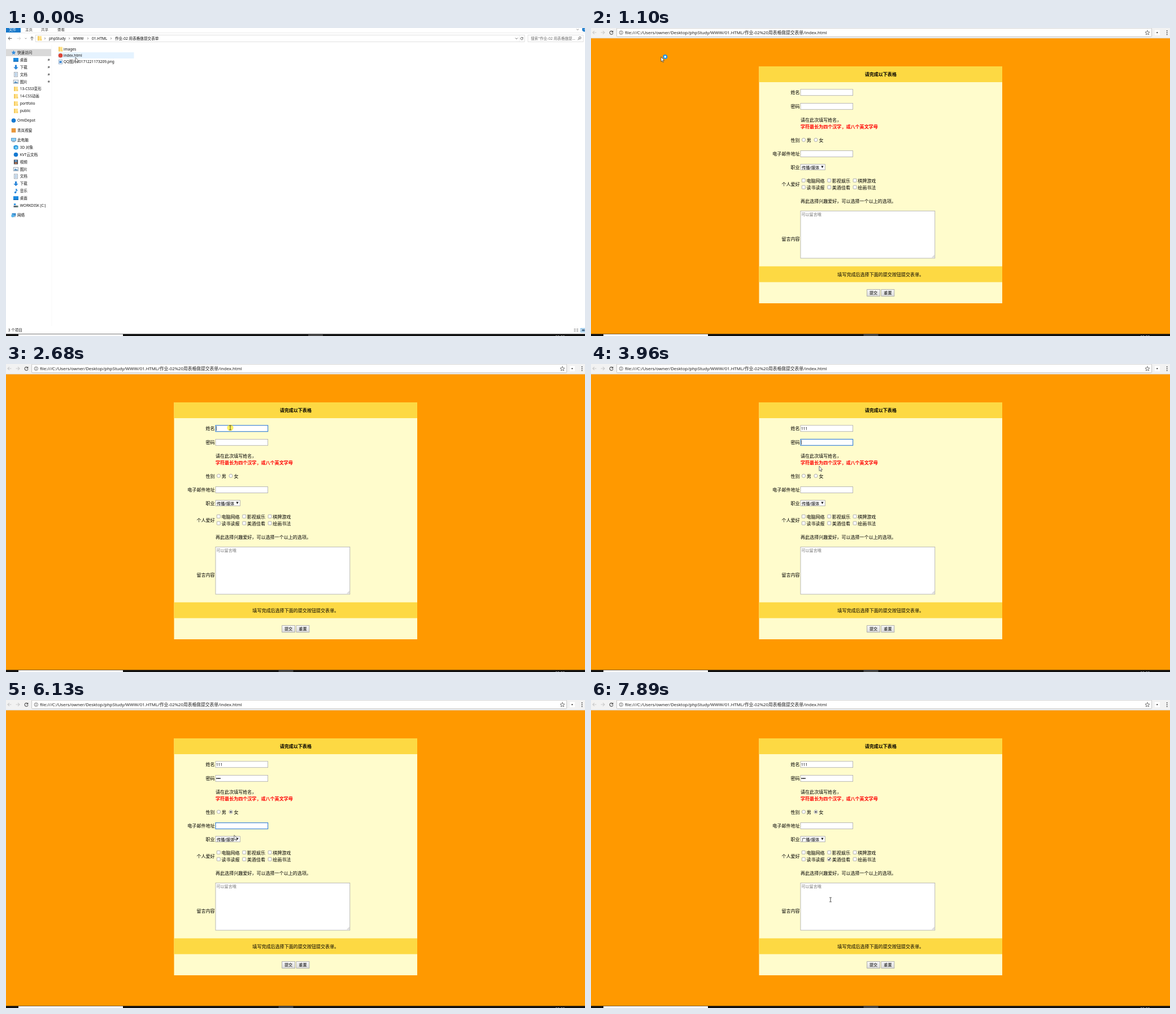
An HTML page that plays this animation: 1025 by 546 pixels, repeating every 8000 ms.

```html
<!DOCTYPE html>
<html>
<head>
<meta charset="utf-8">
<title>Form demo</title>
<style>
html, body { margin: 0; width: 100%; height: 100%; overflow: hidden; background: #fff; }
svg { display: block; width: 100%; height: 100%; }
text { font-family: "Noto Sans", "Noto Sans CJK SC", "Noto Sans CJK", sans-serif; white-space: pre; }
</style>
</head>
<body>
<svg id="stage" viewBox="0 0 1025 546" xmlns="http://www.w3.org/2000/svg"></svg>
<script>
const LOOP = 8000;
const SMALL = 6.6, BODY = 8.06, FIELD = 7.1;

// ---------- drawing helpers ----------
const rect = (x, y, w, h, fill, extra = '') =>
  `<rect x="${x}" y="${y}" width="${w}" height="${h}" fill="${fill}" ${extra}/>`;
const box = (x, y, w, h, fill, line, extra = '') =>
  rect(x, y, w, h, fill, `stroke="${line}" stroke-width=".8" ${extra}`);
const circle = (x, y, r, fill, extra = '') =>
  `<circle cx="${x}" cy="${y}" r="${r}" fill="${fill}" ${extra}/>`;
const line = (d, color, width = 1, extra = '') =>
  `<path d="${d}" fill="none" stroke="${color}" stroke-width="${width}" ${extra}/>`;
const shape = (d, fill, extra = '') => `<path d="${d}" fill="${fill}" ${extra}/>`;
const text = (x, cy, s, size = BODY, fill = '#000', extra = '') =>
  `<text x="${x}" y="${(cy + size * .37).toFixed(2)}" font-size="${size}" fill="${fill}" ${extra}>${s}</text>`;
const group = (id, body, extra = '') => `<g id="${id}" ${extra}>${body}</g>`;
const place = (x, y, body) => `<g transform="translate(${x} ${y})">${body}</g>`;

// ---------- file manager ----------
const icons = {
  folder: rect(-3.5, -4, 7, 8, '#ffe08a') + rect(-3.5, -4, 2, 8, '#f3c95c') + rect(1.8, 1, 2, 3, '#f5d06c'),
  desk: rect(-4.5, -3.5, 9, 6.5, '#1c8ae0') + rect(-4.5, 2, 9, 1.2, '#0b5fa8'),
  down: shape('M-1.6 -4H1.6V0H4.2L0 4.3-4.2 0H-1.6Z', '#2b86d9'),
  doc: box(-3, -4, 6, 8, '#fff', '#8a97a5') + line('M-1.7 -2H1.7M-1.7 0H1.7M-1.7 2H1.7', '#4f8fcb', .8),
  pic: box(-4.3, -3, 8.6, 6, '#eef5fb', '#8a97a5') + shape('M-3.5 2.3L-1 -1 1 1 2.2 0 3.5 2.3Z', '#3f7fb5'),
  file: box(-3, -3.8, 6, 7.6, '#fff', '#7d9cc0') + rect(-1.9, -1.6, 3.8, 3.6, '#2d7fd0'),
  star: shape('M0 -4L1.2 -1.3 4 -1 1.8 .9 2.5 3.8 0 2.2-2.5 3.8-1.8 .9-4 -1-1.2 -1.3Z', '#2f8be0'),
  pc: rect(-4.3, -3.6, 8.6, 5.6, '#3c7fb8') + rect(-3.5, -2.9, 7, 4.2, '#8fd0f5') + rect(-2.5, 2.7, 5, 1, '#7b8a98'),
  cube: shape('M-4 -2.6L0 -4 4 -2.6V2.8L0 4.2-4 2.8Z', '#2496dd') + rect(-1.6, -1.4, 4, 4, '#7cd0f4'),
  film: rect(-3.6, -4, 7.2, 8, '#3d4656') + rect(-2, -3.2, 4, 3, '#6ea7d8') + rect(-2, .4, 4, 3, '#b4734f'),
  note: circle(-1, 2.5, 1.7, '#2688dd') + line('M.4 2.5V-4Q1 -1.6 3 -.6', '#2688dd', 1.2),
  disk: rect(-4, .2, 8, 3, '#5c6670') + rect(-3.6, -3.4, 3.4, 2.6, '#1c8ae0') + rect(1.4, 1.2, 1.6, .9, '#6fe08a'),
  net: rect(-3, -3.4, 7, 4.8, '#3c8fd0') + circle(-1.6, 1.2, 2.6, '#58b4ea') + rect(.5, 2.2, 3, 1, '#7b8a98'),
  round: circle(0, 0, 3.8, '#1479d2'),
  square: rect(-3.8, -3.8, 7.6, 7.6, '#e8963a'),
  dot: circle(0, 0, 3.8, '#db4437')
};
const sideRows = [
  ['star', '快速访问', 43.5, 1], ['desk', '桌面', 56.5], ['down', '下载', 69.5], ['doc', '文档', 82.5],
  ['pic', '图片', 95.2], ['folder', '13-CSS3变形', 108], ['folder', '14-CSS动画', 121],
  ['folder', 'portfolio', 134], ['folder', 'public', 147], ['round', 'OmiDepot', 164, 1],
  ['square', '青岚视窗', 181.5, 1], ['pc', '此电脑', 198.5, 1], ['cube', '3D 对象', 211.5],
  ['round', 'KVT云文档', 224.5], ['film', '视频', 237.5], ['pic', '图片', 250.2], ['doc', '文档', 263],
  ['down', '下载', 276], ['note', '音乐', 289], ['desk', '桌面', 301.7],
  ['disk', 'WORKDISK (C:)', 314.7], ['net', '网络', 331.7, 1]
];
const back = 'M3.4 0H-3M0 -2.8L-3 0 0 2.8', fwd = 'M-3.4 0H3M0 -2.8L3 0 0 2.8';
const chevron = (x, y) => place(x, y, line('M-.8 -1.5L.8 0-.8 1.5', '#555', .8));
const reload = (x, y, r, color) => place(x, y,
  line(`M${r * .8} ${-r * .6}A${r} ${r} 0 1 0 ${r} ${r * .3}`, color, r * .38) +
  shape(`M${r * 1.1} ${-r * 1.2}V${-r * .1}H0Z`, color));

function explorer() {
  let s = rect(0, 0, 1025, 546, '#fff') + rect(0, 0, 26, 8, '#1979ca') + text(5, 2.5, '文件', SMALL, '#fff');
  [[34, '主页'], [62, '共享'], [91, '查看']].forEach(([x, w]) => s += text(x, 2.5, w, SMALL, '#333'));
  s += line('M26 8.7H1025', '#e3e3e3', .8) + line('M1010 1.8L1012 3.6 1014 1.8', '#777', .8) +
    circle(1024, 2.5, 4, '#1979ca') + text(1022.5, 2.5, '?', 5.5, '#fff');
  s += place(7, 18.5, line(back, '#444', .9)) + place(23, 18.5, line(fwd, '#d0d0d0', .9)) +
    line('M33.5 17.7L35 19.2 36.5 17.7', '#777', .8) +
    line('M46 22V15.5M43.2 18.3L46 15.5 48.8 18.3', '#444', .9);
  s += box(52.5, 12.4, 865.5, 12.2, '#fff', '#d9d9d9') + box(924, 12.4, 98, 12.2, '#fff', '#d9d9d9') +
    line('M908.5 12.4V24.6', '#e4e4e4', .6) + place(59.5, 18.3, icons.folder);
  [69, 112, 145, 186].forEach(x => s += chevron(x, 18.5));
  [[76, 'phpStudy'], [119, 'WWW'], [152, '01.HTML'], [193, '作业-02 用表格做提交表单']]
    .forEach(([x, w]) => s += text(x, 18.3, w, SMALL, '#111'));
  s += line('M901.8 17.6L903.8 19.6 905.8 17.6', '#555', .9) + reload(913, 18.6, 2.2, '#555') +
    text(929, 18.3, '搜索"作业-02 用表格做提...', SMALL, '#6d6d6d') +
    circle(1016, 17.5, 1.9, 'none', 'stroke="#444" stroke-width=".8"') + line('M1014.7 18.9L1012.3 21.2', '#444', 1);
  s += rect(0, 37.3, 80, 12.6, '#d9d9d9') + line('M81 30V528', '#f8f8f8', .8);
  sideRows.forEach(([icon, label, y, top], i) => {
    s += place(top ? 13.5 : 17.5, y, icons[icon]) + text(top ? 20 : 24.7, y, label, SMALL, '#111');
    if (i > 0 && i < 5)
      s += place(75.5, y, shape('M.2 -2.5L2.5 -.2 1.6 .2 .6 2-.6 .9-2.6 2.6-.9 .6-2 -.6-.2 -1.6Z', '#777'));
  });
  s += rect(92, 43.1, 134.5, 10.9, '#e5f3ff', 'id="row"');
  [['folder', 'images', 37.5], ['dot', 'index.html', 48.7], ['file', 'QQ图片20171221173209.png', 60]]
    .forEach(([icon, label, y]) => s += place(96.5, y, icons[icon]) + text(101.7, y, label, SMALL, '#111'));
  s += text(3.7, 536, '3 个项目', SMALL, '#222');
  for (let y = 533.5; y < 539; y += 2.2) s += line(`M1005.5 ${y}H1008.5M1010 ${y}H1013`, '#777', .8);
  return s + box(1017.5, 532.4, 9, 6.8, '#cfe8fb', '#6aaee0') + rect(1019.5, 534.2, 5, 3.2, '#4a6f8f');
}

// ---------- browser ----------
const field = (id, y) => box(371, y, 92.6, 10.9, '#fff', '#a9a9a9', `id="${id}"`);
const label = (y, s) => text(369.6, y, s, BODY, '#000', 'text-anchor="end"');
const radio = (id, x) => circle(x, 198.3, 3.1, '#fbfbfb', `id="${id}" stroke="#999" stroke-width=".8"`);
const check = (x, y) => box(x - 3, y - 3, 6, 6, '#fbfbfb', '#a0a0a0', 'rx=".7"');
const mid = 'text-anchor="middle"';
const jobs = ['传播/媒体', '社会/媒体', '广播/媒体', '电视/媒体'];
const ITEM = 9.7;

function form() {
  let s = rect(0, 18, 1025, 525, '#ff9900') + rect(297.5, 68, 430.5, 420, '#fffccc') +
    rect(297.5, 68, 430.5, 28, '#fdd943') + rect(297.5, 422.5, 430.5, 28, '#fdd943');
  s += text(512.8, 82, '请完成以下表格', BODY, '#000', mid + ' font-weight="700"') +
    text(512.8, 437, '填写完成后选择下面的提交按钮提交表单。', BODY, '#000', mid);
  [[114.3, '姓名'], [139, '密码'], [198.6, '性别'], [223, '电子邮件地址'],
   [247, '职业'], [277, '个人爱好'], [373.7, '留言内容']].forEach(([y, w]) => s += label(y, w));
  s += field('name', 108.8) + field('pass', 133.4) + field('mail', 217.6);
  s += text(371, 163, '请在此次填写姓名，') +
    text(371, 175, '字符最长为四个汉字，或八个英文字母', BODY, '#f00', 'font-weight="700"') +
    text(371, 306.7, '再此选择兴趣爱好，可以选择一个以上的选项。');
  s += radio('male', 376.5) + text(381.8, 198.6, '男') + radio('female', 398) + text(403.6, 198.6, '女') +
    circle(398, 198.3, 1.6, '#4a4a4a', 'id="picked"');
  [['电脑网络', '影视娱乐', '棋牌游戏'], ['读书读报', '美酒佳肴', '绘画书法']].forEach((row, j) =>
    row.forEach((w, i) => s += check(376.3 + i * 45.4, 270.2 + j * 12) + text(381.4 + i * 45.4, 271 + j * 12, w)));
  s += line('M419.9 282.2L421.3 283.9 423.7 280.1', '#333', 1.2, 'id="tick"');
  s += box(371, 241.6, 43.4, 10, '#f8f8f8', '#a9a9a9', 'id="select"') +
    text(373.3, 247.2, jobs[0], 7, '#000', 'id="job"') + shape('M407.4 244.6H411.6L409.5 248.2Z', '#111');
  s += box(371, 324.3, 237.8, 83.8, '#fff', '#a9a9a9') + text(372.4, 330, '可以留言哦', FIELD, '#757575') +
    line('M603.8 407L608 402.8M606 407L608 405', '#888', .6);
  [[488.6, '提交'], [513.9, '重置']].forEach(([x, w]) =>
    s += box(x, 463.6, 23, 11.8, 'url(#btn)', '#a0a0a0') + text(x + 11.5, 469.6, w, FIELD, '#000', mid));
  s += text(372, 114.3, '', 6.5, '#000', 'id="typed"') + group('dots', [0, 1, 2].map(i =>
    circle(373.4 + i * 2.6, 139, 1.1, '#000')).join('')) + rect(0, 0, .7, 8, '#222', 'id="caret"');
  let list = box(371, 251.8, 43.4, 40, '#fff', '#8f8f8f') + rect(371.4, 0, 42.6, ITEM, '#1e90ff', 'id="hover"');
  jobs.forEach((w, i) => list += text(373.3, 257.2 + i * ITEM, w, 7, '#000', 'class="item"'));
  return s + group('menu', list);
}

function browser() {
  return rect(0, 0, 1025, 543, '#fff') + group('form', form()) + rect(0, 0, 1025, 18, '#f2f2f2') +
    line('M0 18H1025', '#d0d0d0', .7) + box(45.6, .2, 947, 15.2, '#fff', '#b8b8b8', 'rx="1"') +
    place(6, 8, line(back, '#c9c9c9', 1.1)) + place(21, 8, line(fwd, '#c9c9c9', 1.1)) + reload(36, 8.2, 3, '#555') +
    circle(53.3, 8.2, 3.2, 'none', 'stroke="#555" stroke-width=".8"') + line('M53.3 7.6V10M53.3 6.1V6.9', '#555', .9) +
    text(60, 8, 'file:///C:/Users/owner/Desktop/phpStudy/WWW/01.HTML/作业-02%20用表格做提交表单/index.html', 7.77, '#222') +
    place(985, 8.2, shape(icons.star.match(/d="([^"]+)"/)[1], 'none', 'stroke="#555" stroke-width=".8"')) +
    rect(998, 3.5, 9, 9.5, '#fff') + circle(1002.3, 8.2, 1.1, '#333') +
    [5, 8.2, 11.4].map(y => circle(1019.7, y, 1, '#555')).join('');
}

const taskbar = rect(0, 542.3, 1025, 4, '#101010') + rect(22, 542.8, 185, 4, '#fff') +
  rect(535, 542.3, 26, 4, '#464646', 'id="task"') + text(972.5, 547.2, '20:22', SMALL, '#ddd');

const pointer = circle(0, 0, 5.6, '#ffe600', 'id="halo" opacity=".62"') +
  group('arrow', shape('M0 0V8.6L1.9 6.9 3.2 9.9 4.5 9.3 3.2 6.4H5.7Z', '#fff', 'stroke="#111" stroke-width=".6"') +
    circle(7.3, 0, 3, '#e8f6ff', 'id="ring" stroke="#1d93e8" stroke-width="2.2"')) +
  line('M-1.9 -3.8H-.5L0 -3.4 .5 -3.8H1.9M0 -3.4V3.4M-1.9 3.8H-.5L0 3.4 .5 3.8H1.9', '#333', .9, 'id="beam"');

const $ = id => document.getElementById(id);
$('stage').innerHTML = '<defs><linearGradient id="btn" x2="0" y2="1"><stop stop-color="#f7f7f7"/>' +
  '<stop offset="1" stop-color="#dcdcdc"/></linearGradient></defs>' +
  group('files', explorer()) + group('web', browser()) + taskbar + group('pointer', pointer);

// ---------- timeline ----------
// Pointer bursts: start, end, number of steps, goal x, goal y
const moves = [
  [100, 100, 1, 124, 51], [1440, 1873, 5, 404, 187], [1982, 2090, 2, 402, 122], [2310, 2540, 3, 397, 113],
  [2970, 3310, 4, 406, 167], [3450, 3873, 5, 404, 181], [3979, 4190, 3, 395, 161], [4300, 4300, 1, 398, 142],
  [4440, 4630, 3, 402, 203], [4840, 4940, 2, 404, 202], [5080, 5280, 3, 399, 198], [5490, 5600, 2, 403, 221],
  [5810, 5910, 2, 404, 233], [6060, 6165, 2, 404, 246], [6270, 6690, 5, 395, 276], [6910, 7140, 3, 421, 282],
  [7573, 7670, 2, 425, 327], [7820, 7890, 2, 424, 354]
];
const presses = [[580, 790], [2680, 2770], [5280, 5380], [5600, 5810], [6165, 6270], [6830, 6910], [7380, 7477]];
const focusLog = [[0, ''], [2680, 'name'], [3767, 'pass'], [5280, ''], [5600, 'mail'], [6165, 'select'], [7380, '']];
const nameKeys = [3450, 3556, 3661], passKeys = [4190, 4440, 4535];
const wakes = [2680, ...nameKeys, 3767, ...passKeys, 5600];
const caretY = { name: 110.2, pass: 134.8, mail: 219 };

const count = (times, t) => times.filter(k => t >= k).length;
const within = (t, [a, b]) => t >= a && t < b;
const show = (id, on) => $(id).setAttribute('display', on ? 'inline' : 'none');
const set = (id, key, value) => $(id).setAttribute(key, value);

function pointerAt(t) {
  let x = 123, y = 52;
  for (const [t0, t1, n, gx, gy] of moves) {
    if (t < t0) break;
    const step = n < 2 ? 1 : Math.min(n, Math.floor((t - t0) * (n - 1) / (t1 - t0) + .01) + 1);
    x += (gx - x) * step / n;
    y += (gy - y) * step / n;
  }
  return [x, y];
}

function render(t) {
  const [x, y] = pointerAt(t);
  const loaded = t >= 1100;

  show('web', t >= 790);
  set('web', 'opacity', t < 890 ? .5 : 1);
  set('web', 'transform', t < 890 ? 'translate(15.4 8.2) scale(.97)' : '');
  show('form', loaded);
  set('task', 'x', t < 890 ? 535 : 482.5);
  set('row', 'fill', t < 580 ? '#e5f3ff' : '#cce8ff');

  const focus = focusLog.filter(f => t >= f[0]).pop()[1];
  ['name', 'pass', 'mail', 'select'].forEach(id => {
    set(id, 'stroke', id === focus ? '#3f86d6' : '#a9a9a9');
    set(id, 'stroke-width', id === focus ? 1.2 : .8);
  });

  const typed = count(nameKeys, t), dots = count(passKeys, t);
  $('typed').textContent = '1'.repeat(typed);
  [...$('dots').children].forEach((c, i) => c.setAttribute('display', i < dots ? 'inline' : 'none'));
  const wake = wakes.filter(k => t >= k).pop() || 0;
  show('caret', focus in caretY && (t - wake) % 1000 < 500);
  set('caret', 'x', 372.2 + (focus === 'name' ? typed * 3.72 : focus === 'pass' ? dots * 2.6 : 0));
  set('caret', 'y', caretY[focus] || 0);

  set('female', 'fill', within(t, [5280, 5380]) ? '#ccc' : '#fbfbfb');
  show('picked', t >= 5380);
  show('tick', t >= 7477);
  $('job').textContent = jobs[t < 6910 ? 0 : 2];

  const open = within(t, [6165, 6910]);
  const hot = Math.max(0, Math.min(3, Math.floor((y - 252.2) / ITEM)));
  show('menu', open);
  set('hover', 'y', 252.2 + hot * ITEM);
  document.querySelectorAll('.item').forEach((el, i) => el.setAttribute('fill', i === hot ? '#fff' : '#000'));

  const overField = x > 371 && x < 464 && Object.values(caretY).some(c => y > c - 1.4 && y < c + 9.5);
  const beam = loaded && !open && (overField || y > 324);
  set('pointer', 'transform', `translate(${x.toFixed(2)} ${y.toFixed(2)})`);
  show('halo', presses.some(p => within(t, p)));
  show('arrow', !beam);
  show('beam', beam);
  show('ring', within(t, [690, 1440]));
}

const start = performance.now();
function tick() {
  render((performance.now() - start) % LOOP);
  requestAnimationFrame(tick);
}
tick();
</script>
</body>
</html>
```
